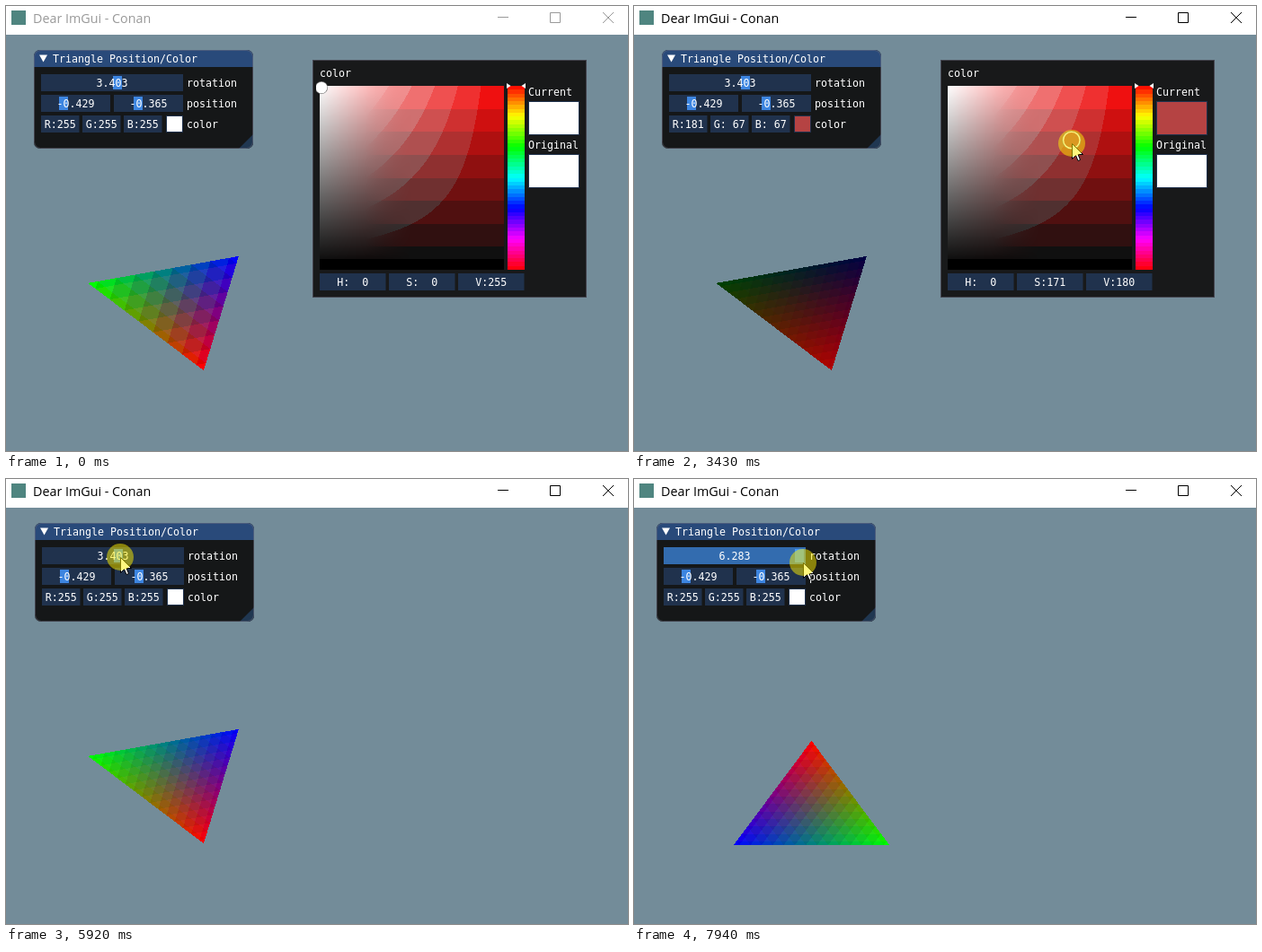
Animation, 692 px wide and 496 px high, one loop 8000 ms. Source, as an HTML page with a canvas:

```html
<!DOCTYPE html>
<html lang="en">
<head>
<meta charset="utf-8">
<title>Triangle Position/Color</title>
<style>
  html, body { margin: 0; width: 100%; height: 100%; overflow: hidden; background: #738c99; }
  canvas { display: block; width: 692px; height: 496px; }
</style>
</head>
<body>
<canvas id="stage" width="692" height="496"></canvas>
<script>
const ctx = document.getElementById('stage').getContext('2d');
const LOOP = 8000, ENTER = 360, PRESS = 1320, PICKED = 4650, RELEASE = 4850, GRAB = 5590, SLIDE = 6880;
const FRAME = '#20324d', ACTIVE = '#336caf', BORDER = 'rgba(110,110,128,.5)';
const MONO = '11.63px "DejaVu Sans Mono", monospace';
const SV = { x: 349, y: 89, size: 205 };
const LAG = 75;

// Pointer key points: time, x, y
const route = [
  [ENTER, 531, 478], [700, 351, 140], [920, 365, 137], [1080, 375, 91],
  [PRESS, 375, 91], [1900, 378, 130], [2580, 411, 139], [2730, 413, 143],
  [3400, 492, 150], [3820, 420, 194], [4040, 398, 194], [4420, 325, 88],
  [PICKED, 305, 82], [RELEASE, 301, 20], [5300, 107, 75], [GRAB, 126, 87],
  [5920, 127, 87], [6450, 132, 87], [6710, 120, 86], [7170, 124, 85],
  [7415, 124, 85], [7940, 188, 93]
];

const clamp = (v, lo = 0, hi = 1) => Math.min(hi, Math.max(lo, v));
const mix = (a, b, k) => a + (b - a) * k;
const rgb = c => `rgb(${c.map(Math.round).join()})`;
const pad = n => String(Math.round(n)).padStart(3);

function pointer(t) {
  const i = clamp(route.findIndex(p => p[0] > t), 0, route.length);
  const [ta, xa, ya] = route[Math.max(0, i - 1)], [tb, xb, yb] = route[i];
  const k = clamp((t - ta) / (tb - ta || 1));
  return [mix(xa, xb, k), mix(ya, yb, k)];
}

// Saturation and value picked at a time
function pick(t) {
  const [x, y] = pointer(Math.max(PRESS, t));
  return t < PRESS ? [0, 1] : [clamp((x - SV.x) / SV.size), 1 - clamp((y - SV.y) / SV.size)];
}

function rect(x, y, w, h, fill) {
  ctx.fillStyle = fill;
  ctx.fillRect(x, y, w, h);
}

function text(s, x, mid, align = 'left') {
  ctx.font = MONO;
  ctx.textAlign = align;
  ctx.fillStyle = '#fff';
  ctx.fillText(s, x, mid + 4);
}

function poly(points, fill) {
  ctx.beginPath();
  points.forEach(([x, y]) => ctx.lineTo(x, y));
  ctx.closePath();
  ctx.fillStyle = fill;
  ctx.fill();
}

function disc(x, y, r, fill) {
  ctx.beginPath();
  ctx.arc(x, y, r, 0, 7);
  ctx.fillStyle = fill;
  ctx.fill();
}

function box(x, y, w, label, fill = FRAME) {
  rect(x, y, w, 19, fill);
  text(label, x + w / 2, y + 10, 'center');
}

function slider(x, y, w, value, lo, hi, active) {
  const k = (value - lo) / (hi - lo);
  rect(x, y, w, 19, active ? ACTIVE : FRAME);
  rect(Math.round(x + 2 + k * (w - 14)), y + 2, 10, 15, active ? '#4296fa' : '#3d85e0');
  text(value.toFixed(3), x + w / 2, y + 10, 'center');
}

function swatch(x, y, w, h, fill) {
  rect(x, y, w, h, FRAME);
  rect(x + 1, y + 1, w - 2, h - 2, fill);
}

// Offscreen bitmap filled by a per-pixel colour rule
function bitmap(w, h) {
  const c = document.createElement('canvas');
  c.width = w;
  c.height = h;
  const g = c.getContext('2d'), img = g.createImageData(w, h);
  return rule => {
    let i = 0;
    for (let y = 0; y < h; y++) for (let x = 0; x < w; x++, i += 4) {
      const p = rule(x + .5, y + .5);
      img.data[i + 3] = p ? 255 : 0;
      if (p) for (let k = 0; k < 3; k++) img.data[i + k] = p[k];
    }
    g.putImageData(img, 0, 0);
    return c;
  };
}

// Eight flat levels at the saturated side, smooth towards grey
const shades = bitmap(SV.size, SV.size)((x, y) => {
  const s = x / SV.size, v = 1 - y / SV.size, soft = clamp((.5 - s) / .25);
  const tone = c => c < .06 && v < .06 ? 0 : mix((Math.floor(c * 8) + .5) / 8, c, soft) * 255;
  const c = tone(v * (1 - s));
  return [tone(v), c, c];
});

const paintTriangle = bitmap(252, 176);
let triKey = '', triangle;

function drawTriangle(angle, tint, levels) {
  const key = [angle, tint, levels].join();
  if (key !== triKey) {
    triKey = key;
    const co = Math.cos(angle), si = Math.sin(angle);
    triangle = paintTriangle((x, y) => {
      const nx = (x - 125.5) / 346, ny = (88 - y) / 232;
      const u = nx * co + ny * si, v = ny * co - nx * si;
      const r = v * 2 + .5, g = (1 - r) / 2 + 2 * u, b = 1 - r - g;
      if (Math.min(r, g, b) < -.001) return null;
      return [r, g, b].map((c, k) => Math.round(c * levels) / levels * tint[k]);
    });
  }
  ctx.drawImage(triangle, 72, 262);
}

function titleBar(active) {
  rect(0, 0, 692, 32, '#fff');
  rect(6, 5, 16, 16, '#4f8580');
  const ink = active ? '#000' : '#999';
  ctx.font = '14.3px "Open Sans", "Noto Sans", sans-serif';
  ctx.textAlign = 'left';
  ctx.fillStyle = ink;
  ctx.fillText('Dear ImGui - Conan', 30, 19);
  ctx.strokeStyle = ink;
  ctx.lineWidth = 1;
  ctx.beginPath();
  ctx.moveTo(547, 12.5); ctx.lineTo(559, 12.5);
  ctx.rect(605.5, 7.5, 11, 11);
  ctx.moveTo(664, 7); ctx.lineTo(676, 19);
  ctx.moveTo(676, 7); ctx.lineTo(664, 19);
  ctx.stroke();
}

function panel(dx, angle, tint, sliding) {
  ctx.save();
  ctx.translate(dx, 0);
  ctx.save();
  ctx.beginPath();
  ctx.roundRect(31, 49, 244, 110, 7);
  ctx.clip();
  rect(31, 49, 244, 110, '#151718');
  rect(31, 49, 244, 19, '#294a7a');
  poly([[275, 143], [275, 159], [259, 159]], '#203751');
  ctx.restore();
  ctx.strokeStyle = BORDER;
  ctx.lineWidth = 1;
  ctx.beginPath();
  ctx.roundRect(31.5, 49.5, 243, 109, 7);
  ctx.stroke();
  poly([[37, 54.6], [46, 54.6], [41.5, 62.4]], '#fff');
  text('Triangle Position/Color', 52, 59);

  slider(39, 76, 158, angle, 0, 2 * Math.PI, sliding);
  slider(39, 99, 77, -.429, -1, 1);
  slider(120, 99, 77, -.365, -1, 1);
  tint.forEach((c, i) => box(39 + 46 * i, 122, 42.5, 'RGB'[i] + ':' + pad(c)));
  swatch(178, 122, 19, 19, rgb(tint));
  ['rotation', 'position', 'color'].forEach((s, i) => text(s, 201, 86 + 23 * i));
  ctx.restore();
}

function popup(s, v, tint, dragging) {
  rect(341, 60, 305, 265, '#18191a');
  ctx.strokeStyle = BORDER;
  ctx.lineWidth = 1;
  ctx.strokeRect(341.5, 60.5, 304, 264);
  text('color', SV.x, 75);
  ctx.drawImage(shades, SV.x, SV.y);

  const edge = i => SV.y + Math.round(i * SV.size / 48);
  for (let i = 0; i < 48; i++) {
    rect(558, edge(i), 19, edge(i + 1) - edge(i), `hsl(${(i + .5) * 7.5} 100% 50%)`);
  }
  poly([[557, 86], [557, 92], [561.5, 89]], '#fff');
  poly([[578, 86], [578, 92], [573.5, 89]], '#fff');

  ['Current', 'Original'].forEach((label, i) => {
    text(label, 581, 96 + 59 * i);
    swatch(581, 106 + 59 * i, 57, 38, i ? '#fff' : rgb(tint));
  });
  [0, s, v].forEach((n, i) => box(349 + 77 * i, 298, 73.5, 'HSV'[i] + ':' + pad(n * 255)));

  const x = clamp(SV.x + s * SV.size, 351, 552), y = clamp(SV.y + (1 - v) * SV.size, 91, 292);
  const r = dragging ? 9.5 : 6;
  ctx.save();
  ctx.beginPath();
  ctx.rect(345, 64, 297, 257);
  ctx.clip();
  disc(x, y, r + 1, '#808080');
  disc(x, y, r + .3, '#fff');
  disc(x, y, r - 1, rgb(tint));
  ctx.restore();
}

function drawPointer(x, y, pressed) {
  const arrow = [[0, 0], [0, 17], [4, 13], [6.5, 19], [9, 18], [6.5, 12], [12, 12]];
  poly(arrow.map(([a, b]) => [x + a + .5, y + b + .5]), '#fff');
  ctx.strokeStyle = '#000';
  ctx.lineWidth = 1;
  ctx.stroke();
  if (pressed) disc(x, y, 15, 'rgba(255,240,0,.5)');
}

function draw(t) {
  const [x, y] = pointer(t).map(Math.round);
  const active = t >= PRESS, sliding = t >= SLIDE;
  const pressed = active && t < RELEASE || t >= GRAB;

  // The picker trails the pointer by one update, its colour by two
  const seen = Math.min(t, PICKED);
  const [s, v] = pick(seen - LAG), [s2, v2] = pick(seen - 2 * LAG);
  const dim = v2 * (1 - s2) * 255, tint = [v2 * 255, dim, dim];

  const angle = sliding ? clamp((x - 40) / 144) * 2 * Math.PI : 3.403;
  const dx = t < GRAB ? 0 : t < 6710 ? x - 126 : -6;

  rect(0, 0, 692, 496, '#738c99');
  titleBar(active);
  drawTriangle(angle, tint, active ? 14 : 8);
  panel(dx, angle, tint, sliding);
  if (t < GRAB + LAG) popup(s, v, tint, pressed);
  if (t >= ENTER) drawPointer(x, y, pressed);
}

const start = performance.now();
function tick() {
  // Past the last key point the pointer rests
  draw(Math.min((performance.now() - start) % LOOP, 7939.9));
  requestAnimationFrame(tick);
}
tick();
</script>
</body>
</html>
```
